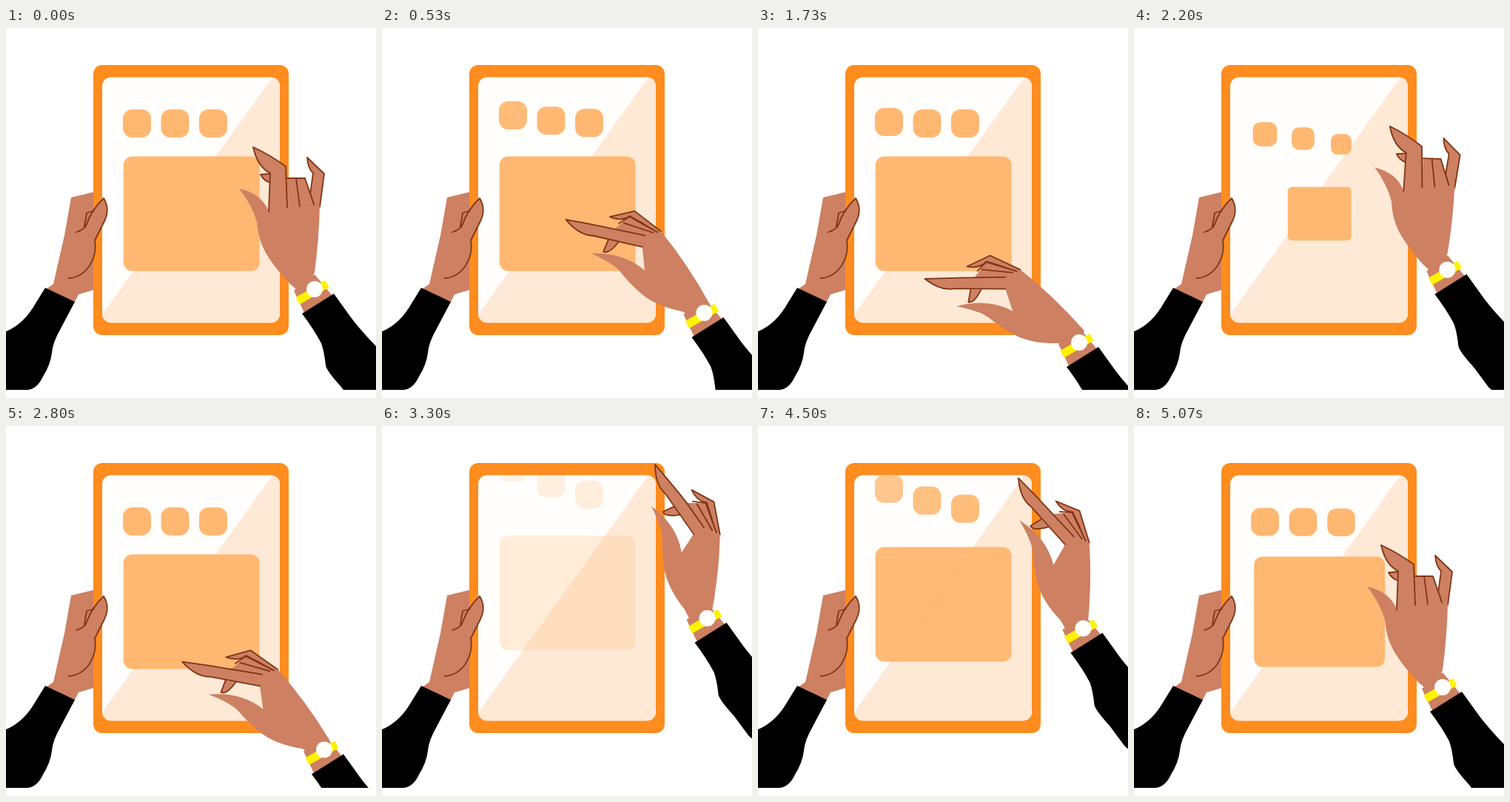
An HTML page for the animation above (5.11 s loop, 500 by 500 pixels).

```html
<!DOCTYPE html>
<html lang="en">
<head>
<meta charset="utf-8">
<title>Tablet swipe</title>
<style>
  html, body { margin: 0; width: 100%; height: 100%; overflow: hidden; background: #fff; }
  svg { display: block; width: 100vw; height: 100vh; }
  .skin { fill: #cd8062; }
  .line { stroke: #803414; stroke-width: 1.8; stroke-linejoin: round; stroke-linecap: round; }
  .bare { fill: none; }
  .tile { fill: #ffb871; }
</style>
</head>
<body>
<svg viewBox="0 0 500 500">
  <defs>
    <clipPath id="screen"><rect x="130" y="66.6" width="240" height="331.6" rx="12"/></clipPath>
    <clipPath id="floor"><rect width="500" height="489"/></clipPath>
  </defs>

  <path class="skin" d="M88 229L125 220V352L98 360L90 376L50 356L64 346L79 280Z"/>
  <rect x="118" y="50" width="264" height="365" rx="12" fill="#ff8c1e"/>
  <g clip-path="url(#screen)">
    <rect x="130" y="66" width="240" height="333" fill="#fffefc"/>
    <path d="M360.3 66H370V399H130V387.3Z" fill="#fee9d7"/>
    <g id="tiles"></g>
  </g>

  <path class="skin" d="M132 230Q141 245 133 261L120 287Q124 306 112 322L95 300L95 276Q107 272 109 265Q116 245 132 230Z"/>
  <path class="line bare" d="M95 276Q107 272 109 265Q116 245 132 230Q141 245 133 261L120 287C124 310 110 336 85 338M106 268L109 250L119 247"/>
  <path d="M53 351L93 370L74 406Q63 425 62 439Q60 455 50 471Q42 488 29 489H0V410Q22 401 37 377Z"/>

  <g clip-path="url(#floor)">
    <path id="forearm" class="skin" d="M-28 2L0 -20L30 16L-10 40Z"/>
    <g id="hand"></g>
    <g id="arm">
      <path d="M-17 33L26 6L44 31Q57 50 83 77L150 150V240L56 159L36 132Q16 110 15 103Q13 84 9 73Q-1 54 -17 33Z"/>
      <rect x="-23" y="-5.5" width="46" height="11" fill="#fff200" transform="translate(-3 4.3) rotate(-30)"/>
      <circle r="11" fill="#fff"/>
    </g>
  </g>
</svg>
<script>
const NS = 'http://www.w3.org/2000/svg';
const $ = id => document.getElementById(id);
const PERIOD = 5110 / 4;

function add(parent, tag, attrs) {
  const el = document.createElementNS(NS, tag);
  for (const key in attrs) el.setAttribute(key, attrs[key]);
  return parent.appendChild(el);
}

const clamp = v => Math.max(0, Math.min(1, v));
const ramp = (t, a, b) => clamp((t - a) / (b - a));
const smooth = (t, a, b) => { const u = ramp(t, a, b); return u * u * (3 - 2 * u); };
const mix = (a, b, u) => a + (b - a) * u;

// Tiles: accelerate upwards and fade, then pop back in.
const tile = (x, y, w, h, r, leave, enter, tau, rise) => ({
  x, y, leave, enter, tau, rise,
  el: add($('tiles'), 'rect', { class: 'tile', x: -w / 2, y: -h / 2, width: w, height: h, rx: r })
});
const tiles = [
  tile(177, 129, 38, 38, 12.5, 394, 724, 100, 106),
  tile(228.5, 129, 38, 38, 12.5, 449, 758, 100, 106),
  tile(280, 129, 38, 38, 12.5, 497, 790, 100, 106),
  tile(250.7, 251, 184, 155, 12, 537, 847, 120, 0)
];
const SWAP = 770;

function drawTile(o, t) {
  let scale = 1, dy = 0, opacity = 1;
  if (t < SWAP) {
    const push = Math.max(0, t - o.leave) ** 2;
    dy = -0.00059 * push;
    opacity = (1 - 2.7e-6 * push) * (1 - ramp(t, 680, SWAP));
  } else {
    const grown = 1 - Math.exp(-Math.max(0, t - o.enter) / o.tau);
    scale = grown * smooth(t, SWAP, 860);
    dy = o.rise * (1 - scale);
  }
  o.el.setAttribute('transform', `translate(${o.x} ${o.y + dy}) scale(${scale})`);
  o.el.setAttribute('opacity', opacity);
}

// Hand: each part has a relaxed and a pointing outline with matching commands.
const RELAXED = { x: 401, y: 345, turn: 47 };
const POINTING = { x: 418, y: 418, turn: 0 };

function rotate([x, y], deg) {
  const a = deg * Math.PI / 180, c = Math.cos(a), s = Math.sin(a);
  return [x * c - y * s, x * s + y * c];
}

function localPoints(d, pose) {
  const n = d.match(/[\d.]+/g).map(Number), points = [];
  for (let i = 0; i < n.length; i += 2)
    points.push(rotate([n[i] - pose.x, n[i + 1] - pose.y], -pose.turn));
  return points;
}

const part = (cls, relaxed, pointing) => ({
  el: add($('hand'), 'path', { class: cls }),
  shape: relaxed.replace(/[\d.]+ [\d.]+/g, '#'),
  from: localPoints(relaxed, RELAXED),
  to: localPoints(pointing, POINTING)
});

const parts = [
  part('skin line',
    'M357 197L344 198Q349 207 357 209',
    'M287 355L284 372Q292 374 301 355'),
  part('skin line',
    'M424 242L430 197L407 175Q408 190 415 196L411 225L416 240',
    'M354 328L313 309L282 324Q300 327 308 317L328 323L349 331'),
  part('skin',
    'M380 203L404 203L416 240L380 242Z',
    'M292 339L308 318L349 330L333 340Z'),
  part('skin',
    'M334 161Q356 171 378 187L380 238L424 240Q423 285 417 330L402 362L383 345Q358 318 349 300Q341 285 339 262Q333 240 315 217Q346 224 355 248L356 225L357 196Q340 188 334 161Z',
    'M225 341Q270 339 290 339L334 338L354 328Q398 362 441 410L430 432L406 427Q368 428 345 415Q325 404 312 393Q300 384 268 378Q310 366 344 384L334 354L266 354Q247 358 225 341Z'),
  part('line bare',
    'M380 203L404 203L416 238M392 203L397 241',
    'M296 330L308 318L349 330M302 328L344 332'),
  part('line bare',
    'M355 248L357 196Q340 188 334 161Q356 171 378 187L380 242',
    'M334 354L266 354Q247 358 225 341Q270 339 290 339L334 338')
];

// time, wrist x, wrist y, hand turn
const keys = [
  [0, 417, 353, RELAXED.turn],
  [245, 430, 437.5, 10.5],
  [440, 434, 426, 0],
  [720, 440, 258, 53],
  [1030, 417, 353, RELAXED.turn],
  [1300, 417, 353, RELAXED.turn]
];

function wristAt(t) {
  const i = keys.findIndex(k => k[0] > t);
  const a = keys[i - 1], b = keys[i], u = smooth(t, a[0], b[0]);
  return [1, 2, 3].map(j => mix(a[j], b[j], u));
}

function drawHand(t) {
  const [x, y, turn] = wristAt(t);
  const point = smooth(t, 0, 225) - smooth(t, 715, 905);
  for (const p of parts) {
    let i = 0;
    p.el.setAttribute('d', p.shape.replace(/#/g, () => {
      const a = p.from[i], b = p.to[i++];
      const [px, py] = rotate([mix(a[0], b[0], point), mix(a[1], b[1], point)], turn);
      return `${(x - 16 + px).toFixed(2)} ${(y - 8 + py).toFixed(2)}`;
    }));
  }
  for (const id of ['forearm', 'arm']) $(id).setAttribute('transform', `translate(${x} ${y})`);
}

function render(now) {
  const t = now % PERIOD;
  tiles.forEach(o => drawTile(o, t));
  drawHand(t);
}

let start;
function frame(now) {
  start ??= now;
  render(now - start);
  requestAnimationFrame(frame);
}
render(0);
requestAnimationFrame(frame);
</script>
</body>
</html>
```
